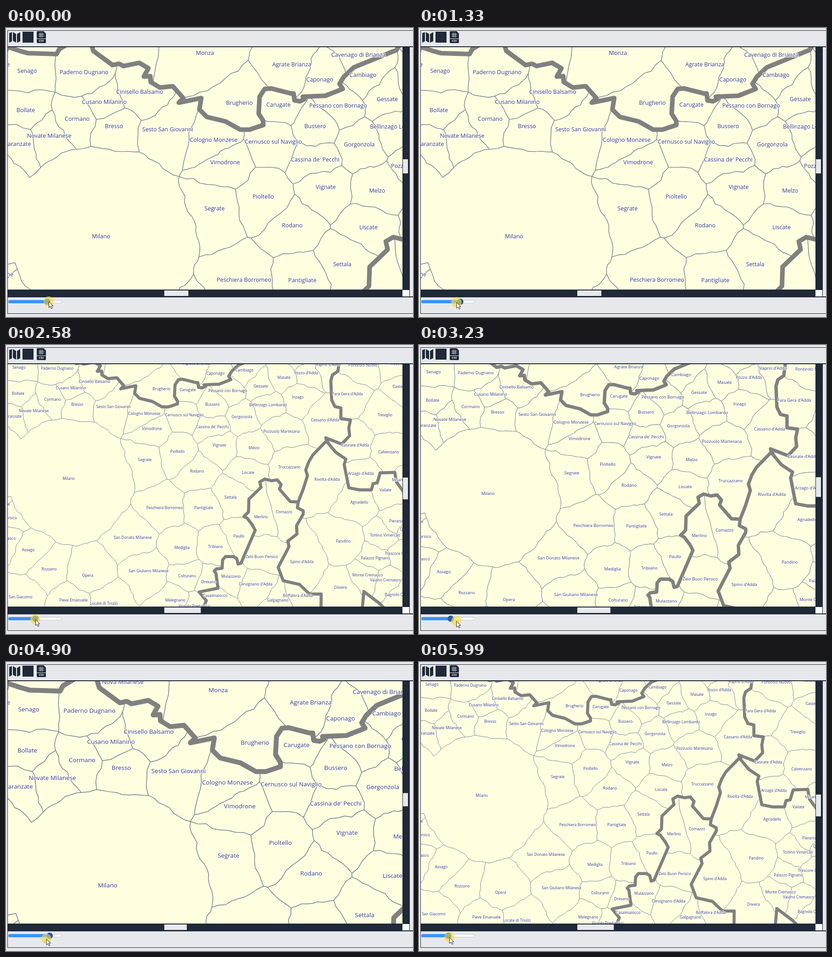
Write an HTML page with a canvas that moves like this. It is 887 by 632 pixels and loops after 6.24 s.

```html
<!DOCTYPE html>
<html lang="it">
<head>
<meta charset="utf-8">
<title>Map zoom slider</title>
<style>
html, body { margin: 0; width: 887px; height: 632px; overflow: hidden; background: #e7e8ec; }
canvas { display: block; }
</style>
</head>
<body>
<canvas id="stage" width="887" height="632"></canvas>
<script>
const ctx = document.getElementById('stage').getContext('2d');
const LOOP = 6240, FRAME = 80, LAG = 280;
const DARK = '#1f2937', PANEL = '#e7e8ec', LAND = '#ffffe0';
const ORIGIN = { x: -8, y: -42 };

// The slider has seven stops; every stop zooms out by the same amount.
const LAST_STOP = 6;
const zoomAt = stop => 1.067 - .0658 * stop;
const thumbAt = stop => 95.3 - 5.22 * stop;
const CLOSE = 1, MIDDLE = zoomAt(5), FAR = zoomAt(6);

let seed = 7;
const random = () => (seed = seed * 16807 % 2147483647) / 2147483647;

// Shapes and places are measured at one zoom and stored in units of zoom 1.
function outline(zoom, data) {
  const k = 1 / zoom, path = new Path2D();
  path.addPath(new Path2D(data), new DOMMatrix([k, 0, 0, k, ORIGIN.x * (1 - k), ORIGIN.y * (1 - k)]));
  return path;
}
// "Name x y", with an optional weight for towns that reach further
function places(zoom, list) {
  return list.split('|').map(item => {
    const [, text, x, y, reach = 0] = item.match(/(\D+) (-?\d+) (\d+) ?(\d+)?/);
    return { text, x: ORIGIN.x + (x - ORIGIN.x) / zoom, y: ORIGIN.y + (y - ORIGIN.y) / zoom, reach: +reach };
  });
}

function roughLine(path, x1, y1, x2, y2) {
  const dx = x2 - x1, dy = y2 - y1, length = Math.hypot(dx, dy);
  if (length < 18) return path.lineTo(x2, y2);
  const shift = (random() - .5) * .25 * Math.min(1, 60 / length);
  const mx = (x1 + x2) / 2 - dy * shift, my = (y1 + y2) / 2 + dx * shift;
  roughLine(path, x1, y1, mx, my);
  roughLine(path, mx, my, x2, y2);
}

// Town limits: the edges of a weighted Voronoi diagram, slightly roughened
function townLimits(towns) {
  const path = new Path2D();
  towns.forEach((a, i) => towns.slice(i + 1).forEach(b => {
    if (a.text === b.text) return;
    const dx = b.x - a.x, dy = b.y - a.y, d2 = dx * dx + dy * dy, d = Math.sqrt(d2);
    const k = (d2 + a.reach - b.reach) / (2 * d2);
    const mx = a.x + dx * k, my = a.y + dy * k, nx = -dy / d, ny = dx / d;
    let from = -900, to = 900;
    for (const c of towns) {
      if (c === a || c === b) continue;
      const cx = c.x - a.x, cy = c.y - a.y;
      const slope = 2 * (cx * nx + cy * ny);
      const t = (cx * cx + cy * cy + a.reach - c.reach - 2 * (cx * (mx - a.x) + cy * (my - a.y))) / slope;
      if (slope > 0) to = Math.min(to, t);
      else from = Math.max(from, t);
    }
    if (from >= to) return;
    path.moveTo(mx + nx * from, my + ny * from);
    roughLine(path, mx + nx * from, my + ny * from, mx + nx * to, my + ny * to);
  }));
  return path;
}

// Later provinces cover the hidden sides of earlier ones.
const provinces = [];
function province(border, ...lists) {
  const towns = lists.flat();
  provinces.push({ border, towns, limits: townLimits(towns) });
}

province(outline(CLOSE, 'M-100-100H1500V1100H-100Z'),
  places(CLOSE, `Senago 46 95|Paderno Dugnano 170 98|Cambiago 777 104|Cinisello Balsamo 291 141|Cusano Milanino 214 162|Cormano 155 199|Bollate 43 180|Novate Milanese 94 236|Baranzate 25 254|Bresso 235 215|Sesto San Giovanni 352 222|Carugate 593 168|Pessano con Bornago 723 170|Gessate 830 156|Bussero 673 215|Cologno Monzese 452 245|Cernusco sul Naviglio 582 249|Gorgonzola 769 255|Cassina de' Pecchi 673 288|Vimodrone 477 294|Vignate 696 348|Melzo 808 356|Pioltello 560 369|Segrate 454 395|Rodano 623 432|Liscate 789 436|Milano 207 456 35000|Milano -120 400 28800|Settala 732 517|Peschiera Borromeo 518 551|Pantigliate 645 552|Garbagnate Milanese -54 81|Cesano Boscone -32 539`),
  places(MIDDLE, `Masate 666 83|Pozzo d'Adda 719 72|Vaprio d'Adda 772 52|Trezzano Rosa 700 38|Inzago 699 130|Bellinzago Lombardo 628 149|Cassano d'Adda 764 185|Pozzuolo Martesana 660 212|Truccazzano 679 298|Paullo 558 464|Tribiano 502 489|Mediglia 422 491|Colturano 434 559|San Donato Milanese 304 467|San Giuliano Milanese 342 547|Opera 196 558|Rozzano 104 543|Assago 54 497|Corsico 11 420|Buccinasco 0 469`),
  places(FAR, `Vizzolo Predabissi 411 572|Melegnano 369 559|Dresano 442 519|Locate di Triulzi 213 566|Pieve Emanuele 147 559|San Giacomo 32 552`));

province(outline(CLOSE, `M-30 30 30 50 48 55 110 57 116 46 160 20 180 15 190 50 232 81 246 78 256 83 290 76 310 88 300 106
  314 105 315 118 335 130 363 127 386 153 376 163 425 153 421 178 437 194 478 204 510 222 530 222 560 212 560 203
  550 187 552 150 563 133 577 132 620 143 626 143 628 158 640 160 650 155 646 150 668 149 695 148 733 133 726 122
  735 107 757 86 850 48 880 0 880-40-30-40Z`),
  places(CLOSE, `Nova Milanese 238 39|Monza 433 56|Agrate Brianza 622 81|Cavenago di Brianza 767 60|Caponago 683 114|Brugherio 508 164`));

province(outline(MIDDLE, `M801 20 795 67 782 76 778 90 780 136 788 152 802 155 802 181 825 184 821 203 823 222 804 242 768 228
  800 330 850 420 1100 600V20Z`),
  places(MIDDLE, `Fara Gera d'Adda 818 122|Casirate d'Adda 836 245|Arzago d'Adda 850 314`),
  places(FAR, `Arcene 854 42|Pontirolo Nuovo 778 45|Castel Rozzone 872 92|Treviglio 826 154|Calvenzano 834 235|Misano di Gera d'Adda 885 296`));

province(outline(MIDDLE, `M700 381 712 350 722 318 718 304 725 285 735 268 768 234 766 227 770 238 790 262 814 278 810 291
  821 347 847 352 875 352 879 337 889 335 896 311 931 310 935 333 953 358 1100 500V700H640L630 500Z`),
  places(MIDDLE, `Rivolta d'Adda 769 328|Agnadello 846 383|Pandino 808 476|Spino d'Adda 709 525`),
  places(FAR, `Vailate 827 318|Pieranica 853 386|Quintano 877 404|Torlino Vimercati 826 417|Trescore Cremasco 863 457|Palazzo Pignano 805 467|Monte Cremasco 788 504|Vaiano Cremasco 827 515|Dovera 729 531|Bagnolo Cremasco 862 547`));

province(outline(MIDDLE, `M474 660V633L480 618 463 597 508 588 503 552 499 547 504 542 518 540 519 520 526 512 545 512 553 517
  556 530 563 528 597 449 590 436 578 420 570 416 581 405 582 374 611 346 608 333 620 326 636 330 650 328 659 339
  655 350 681 380 700 381 698 395 712 402 712 410 696 438 697 458 675 475 678 488 652 538 664 570 703 579 727 602
  755 602 754 660H851L857 596 895 625 930 660Z`),
  places(MIDDLE, `Comazzo 666 406|Merlino 611 418|Zelo Buon Persico 613 513|Mulazzano 539 561`),
  places(FAR, `Boffalora d'Adda 636 549|Galgagnano 592 559|Cervignano d'Adda 544 524|Casalmaiocco 456 549`));

// Pointer drags: start, end, target x, target y, easing
const easeOut = u => 1 - (1 - u) ** 2, easeInOut = u => u * u * (3 - 2 * u);
const DRAGS = [
  [80, 330, 96, 599, easeOut],
  [930, 2330, 63, 600, easeOut],
  [2420, 4000, 100, 607, easeInOut],
  [4600, 5990, 66, 602, easeOut],
];
function pointerAt(t) {
  let x = 93, y = 598;
  for (const [start, end, toX, toY, ease] of DRAGS) {
    const k = ease(Math.min(1, Math.max(0, (t - start) / (end - start))));
    x += (toX - x) * k;
    y += (toY - y) * k;
  }
  return { x, y };
}
// The map follows the pointer late and in whole stops.
function stopAt(t) {
  const stop = Math.round((97.3 - pointerAt(t - LAG).x) / 5.22);
  return Math.min(LAST_STOP, Math.max(0, stop));
}

function rect(color, x, y, w, h, r = 0) {
  ctx.fillStyle = color;
  ctx.beginPath();
  ctx.roundRect(x, y, w, h, r);
  ctx.fill();
}
function disc(color, x, y, r) {
  ctx.fillStyle = color;
  ctx.beginPath();
  ctx.arc(x, y, r, 0, 7);
  ctx.fill();
}
function shape(color, data) {
  ctx.fillStyle = color;
  ctx.fill(new Path2D(data));
}
function line(color, width, path) {
  ctx.strokeStyle = color;
  ctx.lineWidth = width;
  ctx.stroke(path);
}

function drawMap(zoom) {
  ctx.save();
  ctx.beginPath();
  ctx.rect(4, 42, 860, 531);
  ctx.clip();
  ctx.translate(ORIGIN.x * (1 - zoom), ORIGIN.y * (1 - zoom));
  ctx.scale(zoom, zoom);
  ctx.lineJoin = 'round';
  for (const { border, limits } of provinces) {
    ctx.fillStyle = LAND;
    ctx.fill(border);
    ctx.save();
    ctx.clip(border);
    line('#708090', 1.4, limits);
    ctx.restore();
    line('#808080', 10, border);
  }
  ctx.font = '12.5px "Open Sans", sans-serif';
  ctx.textAlign = 'center';
  ctx.textBaseline = 'middle';
  ctx.strokeStyle = '#fff';
  ctx.lineWidth = 2.5;
  ctx.fillStyle = '#343c6c';
  for (const { text, x, y } of provinces.flatMap(p => p.towns)) {
    ctx.strokeText(text, x, y);
    ctx.fillText(text, x, y);
  }
  ctx.restore();
}

function drawFrame(zoom) {
  rect(DARK, 4, 5, 883, 1);
  rect(DARK, 3, 5, 1, 620);
  rect(DARK, 4, 624, 883, 1);
  rect(DARK, 4, 40, 883, 2);
  rect(DARK, 864, 41, 16, 532);
  rect(DARK, 4, 572, 860, 16);
  rect(DARK, 4, 587, 883, 2);
  rect(DARK, 879, 572, 1, 16);
  rect('#fff', 864, 573, 14, 14);
  rect(PANEL, 345, 574, 55.5 / zoom - 3, 12);
  rect(PANEL, 865, 287 + 6 * (1 / zoom - 1), 11, 34 / zoom - 3);
}

function drawIcons() {
  shape(DARK, 'M7 11 13 9V29L7 32ZM15 9 22 13V32L15 28ZM24 13 31 9V29L24 32Z');
  rect(DARK, 36, 8, 24, 24);
  shape(DARK, 'M69 7H82L87 12V31Q87 33 85 33H69Q67 33 67 31V9Q67 7 69 7Z');
  for (const d of [0, 4]) {
    rect(PANEL, 74 + d, 10, 1, 11);
    rect(PANEL, 71, 13 + d, 12, 1);
  }
  rect(PANEL, 67, 23, 20, 1);
  ctx.fillStyle = '#fff';
  ctx.font = 'bold 6px "Open Sans", sans-serif';
  ctx.textAlign = 'center';
  ctx.textBaseline = 'middle';
  ctx.fillText('CSV', 77, 28.5);
}

const arrow = new Path2D('M.5 .5V13.5L3.5 10.7 5.8 15.5 8 14.5 5.8 9.8H9.8Z');

function drawSlider(thumb, { x, y }) {
  rect('#c4c6cb', 5, 595, 117, 7, 3.5);
  rect('#fff', 6, 596, 115, 5, 2.5);
  rect('#3793f8', 5, 595, thumb - 5, 7, 3.5);
  disc('#245cab', thumb, 598.5, 6.8);
  disc('rgba(248,218,66,.65)', x, y, 11);
  ctx.save();
  ctx.translate(x, y);
  ctx.fillStyle = '#fff';
  ctx.fill(arrow);
  line('#222', 1, arrow);
  ctx.restore();
}

function draw(now) {
  const t = Math.floor(now % LOOP / FRAME) * FRAME;
  const stop = stopAt(t), zoom = zoomAt(stop);
  rect(PANEL, 0, 0, 887, 632);
  drawMap(zoom);
  drawFrame(zoom);
  drawIcons();
  drawSlider(thumbAt(stop), pointerAt(t));
}

const start = performance.now();
function tick() {
  draw(performance.now() - start);
  requestAnimationFrame(tick);
}
tick();
</script>
</body>
</html>
```
